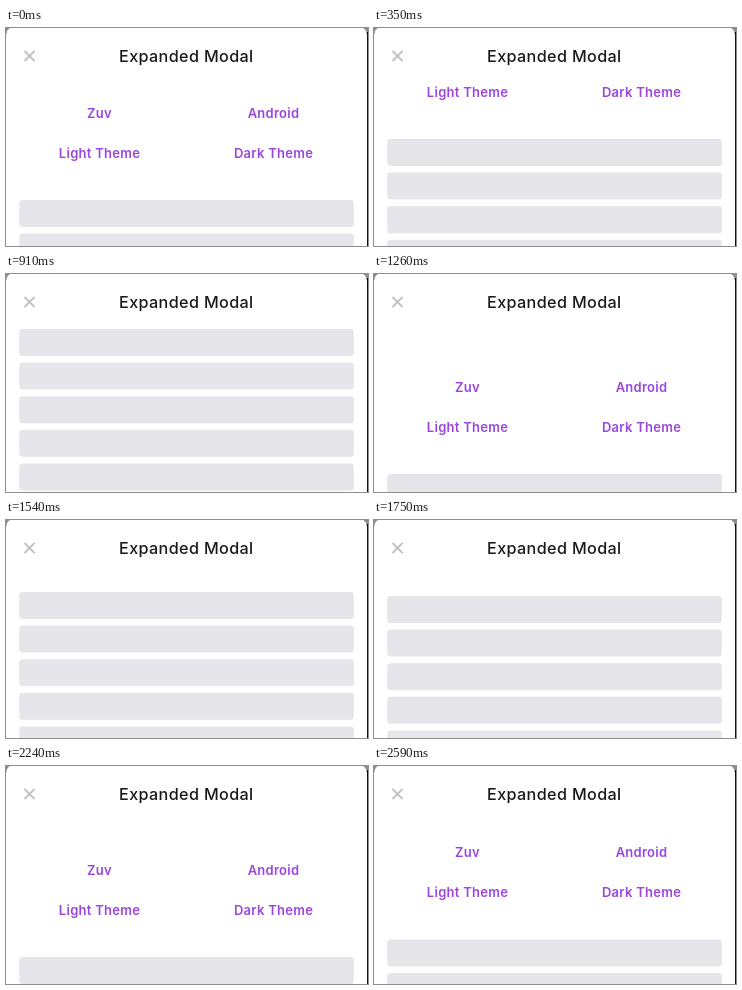
An HTML page with a canvas that plays this animation: 362x218 px, repeating every 2660 ms.

```html
<!DOCTYPE html>
<html lang="en">
<head>
<meta charset="utf-8">
<title>Expanded Modal</title>
<style>
html, body { margin: 0; width: 100%; height: 100%; overflow: hidden; background: #fff; }
canvas { display: block; width: 362px; height: 218px; }
</style>
</head>
<body>
<canvas id="stage" width="362" height="218"></canvas>
<script>
const WIDTH = 362, HEIGHT = 218;
const LOOP = 2660, STEP = 70;
const HEADER_BOTTOM = 51;
const BAR = { x: 13.3, width: 334.5, height: 27, pitch: 33.6, radius: 3 };
const FONT = 'Inter, "Open Sans", sans-serif';
const ctx = document.getElementById('stage').getContext('2d');

// Scroll gesture: [time in ms, top of the first bar]
const path = [
  [0, 172], [350, 111], [770, 45], [840, 45], [910, 55],
  [1260, 200], [1330, 200], [1540, 72], [1640, 58], [1750, 76],
  [1960, 151], [2140, 198], [2240, 191], [2310, 184], [2380, 178.5],
  [2450, 175.5], [2520, 174.2], [2590, 173.4], [LOOP, 172]
];

const slope = i => (path[i + 1][1] - path[i][1]) / (path[i + 1][0] - path[i][0]);

// Zero at turning points, so the curve never overshoots its points
function tangent(i) {
  if (i === 0 || i === path.length - 1) return 0;
  const a = slope(i - 1), b = slope(i);
  return a * b <= 0 ? 0 : 2 * a * b / (a + b);
}

function scrollAt(time) {
  let i = 0;
  while (i < path.length - 2 && time >= path[i + 1][0]) i++;
  const [t0, y0] = path[i], [t1, y1] = path[i + 1];
  const span = t1 - t0, u = (time - t0) / span, v = 1 - u;
  return v * v * (1 + 2 * u) * y0 + u * u * (3 - 2 * u) * y1
    + span * u * v * (v * tangent(i) - u * tangent(i + 1));
}

function label(text, x, baseline, size, weight, color, spacing) {
  ctx.font = `${weight} ${size}px ${FONT}`;
  ctx.letterSpacing = `${spacing}px`;
  ctx.fillStyle = color;
  ctx.fillText(text, x, baseline);
}

function roundRect(x, y, w, h, radius, color) {
  ctx.fillStyle = color;
  ctx.beginPath();
  ctx.roundRect(x, y, w, h, radius);
  ctx.fill();
}

function drawSheet() {
  ctx.fillStyle = '#111';
  ctx.fillRect(0, 0, WIDTH, HEIGHT);
  ctx.fillStyle = '#8c8c8e';
  ctx.fillRect(0, 0, WIDTH, 4);
  roundRect(0, -1, 361, HEIGHT + 12, 8, '#fff');
}

function drawHeader() {
  label('Expanded Modal', 180.3, 34, 16.2, 500, '#1a1a1a', 0.35);
  ctx.strokeStyle = '#c1c1c3';
  ctx.lineWidth = 1.8;
  ctx.beginPath();
  ctx.moveTo(18.5, 23);
  ctx.lineTo(28.5, 33);
  ctx.moveTo(28.5, 23);
  ctx.lineTo(18.5, 33);
  ctx.stroke();
}

function drawContent(top) {
  ctx.save();
  ctx.beginPath();
  ctx.rect(0, HEADER_BOTTOM, WIDTH, HEIGHT);
  ctx.clip();
  const button = (text, x, offset) => label(text, x, top + offset, 13, 600, '#9a45dc', 0.27);
  button('Zuv', 93.5, -82);
  button('Android', 267.5, -82);
  button('Light Theme', 93.5, -42);
  button('Dark Theme', 267.5, -42);
  for (let y = top; y < HEIGHT; y += BAR.pitch) {
    roundRect(BAR.x, y, BAR.width, BAR.height, BAR.radius, '#e5e5ea');
  }
  ctx.restore();
}

function render(now) {
  const time = Math.floor((now % LOOP) / STEP) * STEP;
  ctx.textAlign = 'center';
  drawSheet();
  drawContent(scrollAt(time));
  drawHeader();
}

const start = performance.now();
function tick() {
  render(performance.now() - start);
  requestAnimationFrame(tick);
}
tick();
</script>
</body>
</html>
```
